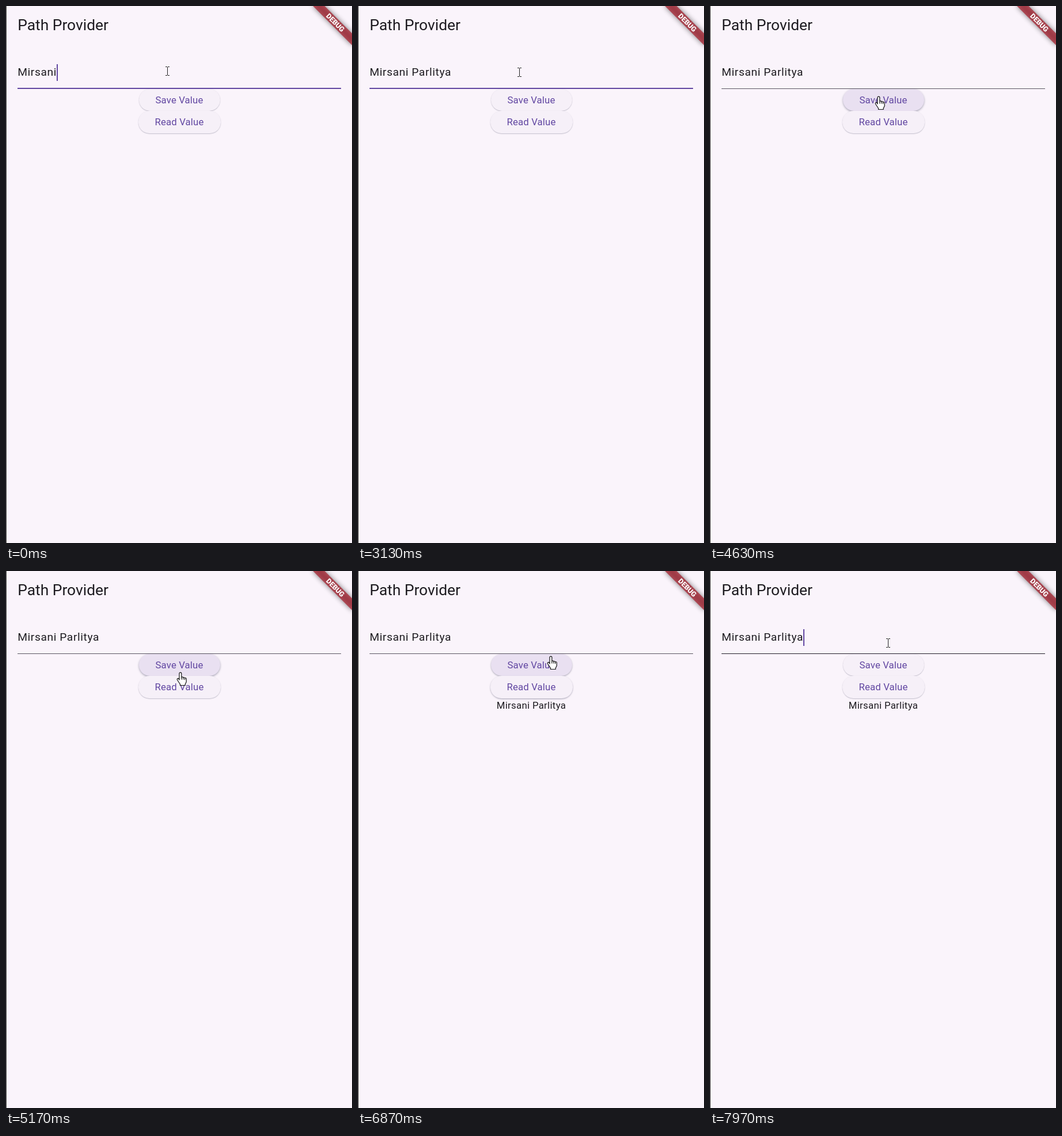
These frames come from a looping animation (601x932 px, 8 s). An HTML page:

```html
<!DOCTYPE html>
<html lang="en">
<head>
<meta charset="utf-8">
<title>Save and read a value</title>
<style>
  :root { --primary: #6247a2; --ink: #1d1b20; }
  html, body { margin: 0; width: 100%; height: 100%; overflow: hidden; }
  body { background: #faf4fb; color: var(--ink); font-family: Roboto, sans-serif; }
  #stage { position: absolute; left: 0; top: 0; width: 601px; height: 932px; overflow: hidden; }
  #stage > * { position: absolute; white-space: pre; }
  #edge { left: 0; top: 0; width: 1px; height: 932px; background: #4c4c4a; }
  #title { left: 20.2px; top: 16.8px; font-size: 26.4px; line-height: 33.6px; }
  #field { left: 20.2px; top: 100.8px; height: 28.8px; display: flex;
           font-size: 19.2px; line-height: 28.8px; letter-spacing: .6px; }
  #caret { width: 2.4px; height: 28.8px; background: var(--primary); }
  #line { left: 20.2px; width: 561.6px; }
  .button { height: 38.4px; border-radius: 19.2px; background: #f6f0f8; color: var(--primary);
            font-size: 16.8px; letter-spacing: .12px; line-height: 38.4px; text-align: center; }
  .button i { position: absolute; inset: 0; border-radius: inherit; overflow: hidden; }
  .button b { position: absolute; border-radius: 50%; background: var(--primary); }
  .button span { position: relative; }
  #save { left: 230.5px; top: 144px; width: 141px; }
  #read { left: 229.5px; top: 182.4px; width: 143px; }
  #result { left: 1px; width: 600px; top: 220.8px; text-align: center;
            font-size: 16.8px; line-height: 24px; letter-spacing: .3px; }
  svg { left: 0; top: 0; }
  #debug { font: 900 12.24px Roboto, sans-serif; }
</style>
</head>
<body>
<div id="stage">
  <div id="edge"></div>
  <div id="title">Path Provider</div>
  <div id="field"><span id="typed"></span><div id="caret"></div></div>
  <div id="line"></div>
  <div id="save" class="button"><i><b></b></i><span>Save Value</span></div>
  <div id="read" class="button"><i><b></b></i><span>Read Value</span></div>
  <div id="result"></div>
  <svg width="601" height="932">
    <defs>
      <filter id="blur" x="-30%" y="-150%" width="160%" height="400%"><feGaussianBlur stdDeviation="4.7"/></filter>
    </defs>
    <g transform="translate(601 0) rotate(45)">
      <rect x="-48" y="33.6" width="96" height="14.4" fill="#000" opacity=".5" filter="url(#blur)"/>
      <rect x="-48" y="33.6" width="96" height="14.4" fill="#a91c2a" opacity=".7"/>
      <text id="debug" x="0" y="45.1" fill="#fff" text-anchor="middle">DEBUG</text>
    </g>
    <g id="beam" fill="none" stroke="#222" stroke-width="1" shape-rendering="crispEdges">
      <path d="M-3 -7.5H0M1 -7.5H4M.5 -7V7M-3 7.5H0M1 7.5H4"/>
    </g>
    <path id="hand" fill="#fff" stroke="#111" stroke-width="1.2" stroke-linejoin="round"
      d="M-2 13V2a1.9 1.9 0 0 1 3.8 0V8.5a1.7 1.7 0 0 1 3 .6a1.7 1.7 0 0 1 2.8 .8a1.6 1.6 0 0 1 2.6 1.5V16.5l-2 4v2H-.5v-2l-5-7.500a1.700 1.700 0 0 1 2.200-2.400ZM1.800 8.500V12.500M4.800 9.100V12.500M7.600 9.900V13"/>
  </svg>
</div>
<script>
const LOOP = 8000, NAME = 'Mirsani Parlitya', START_LENGTH = 7;
const KEYS = [300, 700, 900, 1100, 1400, 1600, 1850, 2050, 2250];
const SAVE_TAP = 3850, READ_TAP = 5550, RESULT_AT = 5700, FOCUS_AT = 7960;
// time, x, y of the pointer's hot spot
const POINTER = [
  [0, 280, 113], [3000, 280, 113], [3130, 280, 115], [3700, 293, 157], [4850, 293, 157],
  [5170, 303, 176], [5400, 306, 203], [6550, 306, 203], [6700, 315, 200],
  [6870, 335, 148], [7300, 311, 126], [7600, 309, 125], [LOOP, 309, 125]
];
const BUTTONS = [
  { id: 'save', tap: [SAVE_TAP, 293, 157], hovers: [[3520, 5220], [6765, 6960]] },
  { id: 'read', tap: [READ_TAP, 306, 203], hovers: [[5220, 6765]] }
];

const $ = id => document.getElementById(id);
const clamp = v => Math.min(1, Math.max(0, v));
const mix = (a, b, k) => a + (b - a) * k;
const ramp = (t, from, to, length) => clamp((t - from) / length) - clamp((t - to) / length);
const blend = (a, b, k) => `rgb(${a.map((v, i) => Math.round(mix(v, b[i], k)))})`;

function pointerAt(t) {
  const i = Math.max(1, POINTER.findIndex(p => p[0] > t));
  const [a, b] = [POINTER[i - 1], POINTER[i]];
  const k = clamp((t - a[0]) / (b[0] - a[0]));
  return [1, 2].map(n => Math.round(mix(a[n], b[n], k)));
}

function drawField(t, hovered) {
  const typed = KEYS.filter(k => k <= t);
  const focused = t < SAVE_TAP || t >= FOCUS_AT;
  const blinkStart = t >= FOCUS_AT ? FOCUS_AT : typed.at(-1) ?? 0;
  $('typed').textContent = NAME.slice(0, START_LENGTH + typed.length);
  $('caret').style.opacity = focused && (t - blinkStart) % 1000 < 500 ? 1 : 0;

  const focus = 1 - ramp(t, SAVE_TAP, FOCUS_AT, 140);
  const height = Math.round(mix(1.2, 2.4, focus));
  const idle = hovered ? [29, 27, 32] : [90, 86, 98];
  Object.assign($('line').style, {
    top: (focus > .5 ? 142 : 143) + 'px', height: height + 'px',
    background: blend(idle, [98, 71, 162], focus)
  });
}

function drawButton({ id, tap: [tap, x, y], hovers }, t) {
  const button = $(id), ink = button.querySelector('i'), ripple = button.querySelector('b');
  const sum = length => hovers.reduce((s, [a, b]) => s + ramp(t, a, b, length), 0);
  const lift = sum(200);
  const press = ramp(t, tap, tap + 300, 75);
  const radius = 20 + 44 * clamp((t - tap) / 225);
  button.style.boxShadow =
    `0 ${mix(.8, 1.6, lift)}px ${mix(1.4, 3.6, lift)}px rgba(60,60,90,${mix(.36, .44, lift)})`;
  ink.style.backgroundColor = `rgba(98,71,162,${.09 * sum(50) + .14 * press})`;
  Object.assign(ripple.style, {
    left: x - button.offsetLeft - radius + 'px', top: y - button.offsetTop - radius + 'px',
    width: radius * 2 + 'px', height: radius * 2 + 'px', opacity: .1 * press
  });
}

function draw(t) {
  const [x, y] = pointerAt(t), overField = y < 144;
  for (const [id, shown] of [['beam', overField], ['hand', !overField]]) {
    $(id).setAttribute('transform', `translate(${x} ${y})`);
    $(id).style.display = shown ? '' : 'none';
  }
  drawField(t, overField);
  BUTTONS.forEach(b => drawButton(b, t));
  $('result').textContent = t >= RESULT_AT ? NAME : '';
}

const start = performance.now();
function tick() {
  draw((performance.now() - start) % LOOP);
  requestAnimationFrame(tick);
}
tick();
</script>
</body>
</html>
```
